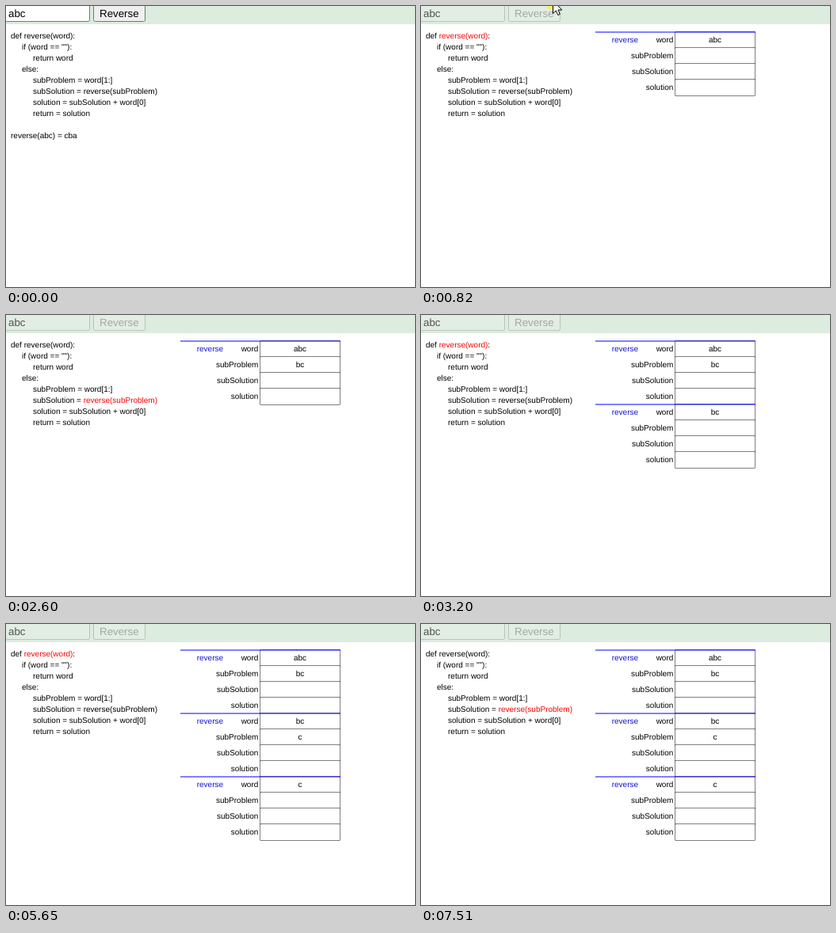
An HTML page with a canvas that plays this animation: 516x355 px, repeating every 8 s.

```html
<!DOCTYPE html>
<html lang="en">
<head>
<meta charset="utf-8">
<title>Recursive reverse</title>
<style>
  html, body { margin: 0; width: 100%; height: 100%; overflow: hidden; background: #fff; }
  canvas { display: block; }
</style>
</head>
<body>
<canvas id="stage" width="516" height="355"></canvas>
<script>
const ctx = document.getElementById('stage').getContext('2d');
const LOOP = 8000;
const CODE_FONT = '10px "Liberation Sans", Arial, sans-serif';
const FORM_FONT = '13.333px "Liberation Sans", Arial, sans-serif';
const WORD = 'abc';

// [indent, text]
const CODE = [
  [0, 'def reverse(word):'],
  [1, 'if (word == ""):'],
  [2, 'return word'],
  [1, 'else:'],
  [2, 'subProblem = word[1:]'],
  [2, 'subSolution = reverse(subProblem)'],
  [2, 'solution = subSolution + word[0]'],
  [2, 'return = solution'],
];
// Every call runs through these four steps: [line, highlighted part]
const PHASES = [
  [0, 'reverse(word)'],
  [1, '(word == "")'],
  [4, 'subProblem = word[1:]'],
  [5, 'reverse(subProblem)'],
];
const STEP_TIMES = [750, 1420, 2010, 2600, 3200, 3870, 4460, 5060, 5650, 6320, 6920, 7510];

function text(str, x, y, color = '#000', align = 'left') {
  ctx.fillStyle = color;
  ctx.textAlign = align;
  ctx.fillText(str, x, y);
}

function field(x, width, fill, border) {
  ctx.beginPath();
  ctx.roundRect(x + 0.5, -2.5, width - 1, 22, 2);
  ctx.fillStyle = fill;
  ctx.fill();
  ctx.strokeStyle = border;
  ctx.stroke();
}

function drawForm(disabled) {
  ctx.fillStyle = '#dcecde';
  ctx.fillRect(0, 0, 516, 23);
  ctx.font = FORM_FONT;
  const faded = 'rgba(239,239,239,.3)';
  const border = disabled ? 'rgba(118,118,118,.35)' : '#767676';
  field(-60, 166, disabled ? faded : '#fff', border);
  field(110, 66, disabled ? faded : '#efefef', border);
  text(WORD, 3, 14, disabled ? '#545454' : '#000');
  text('Reverse', 118, 14, disabled ? 'rgba(16,16,16,.3)' : '#000');
}

function drawCode(step) {
  const [activeLine, part] = step < 0 ? [-1, ''] : PHASES[step % 4];
  ctx.font = CODE_FONT;
  CODE.forEach(([indent, line], i) => {
    const x = 6 + 14 * indent, y = 41 + 14 * i;
    if (i !== activeLine) return text(line, x, y);
    const [before, after] = line.split(part);
    const partX = x + ctx.measureText(before).width;
    text(before, x, y);
    text(part, partX, y, '#f00');
    text(after, partX + ctx.measureText(part).width, y);
  });
  if (step < 0) text(`reverse(${WORD}) = ${[...WORD].reverse().join('')}`, 6, 167);
}

function drawCall(level, step) {
  const top = 33 + 80 * level;
  const word = WORD.slice(level);
  const rest = step >= 4 * level + 2 ? word.slice(1) : '';
  const rows = [['word', word], ['subProblem', rest], ['subSolution', ''], ['solution', '']];
  rows.forEach(([label, value], i) => {
    const y = top + 20 * i;
    ctx.strokeStyle = '#000';
    ctx.strokeRect(321, y, 100, 20);
    ctx.fillStyle = '#fff';
    ctx.fillRect(321, y, 100, 20);
    text(label, 318.3, y + 13, '#000', 'right');
    text(value, 371, y + 13, '#000', 'center');
  });
  text('reverse', 240.7, top + 13, '#1414d2');
  ctx.strokeStyle = '#00f';
  ctx.beginPath();
  ctx.moveTo(220, top);
  ctx.lineTo(422, top);
  ctx.stroke();
}

function drawPointer(t) {
  if (t < 200 || t >= 960) return;
  const tick = Math.floor((t - 200) / 69);
  const left = (1 - Math.min(tick / 6, 1)) ** 1.6;
  const x = 166 + 124 * left;
  const y = 5 + 253 * left - 12 * Math.max(0, tick - 8);
  ctx.save();
  ctx.translate(x, y);
  ctx.fillStyle = 'rgba(255,240,40,.62)';
  ctx.beginPath();
  ctx.arc(0, 0, 11.5, 0, 2 * Math.PI);
  ctx.fill();
  ctx.fillStyle = '#fff';
  ctx.strokeStyle = '#000';
  const arrow = new Path2D('M.5.5V16.5L4.3 13L6.8 18.5L9.3 17.4L7 12H11.8Z');
  ctx.fill(arrow);
  ctx.stroke(arrow);
  ctx.restore();
}

function draw(now) {
  const t = now % LOOP;
  const step = STEP_TIMES.filter(start => start <= t).length - 1;
  ctx.fillStyle = '#fff';
  ctx.fillRect(0, 0, 516, 355);
  drawForm(step >= 0);
  drawCode(step);
  for (let level = 0; step >= 4 * level; level++) drawCall(level, step);
  drawPointer(t);
}

ctx.textRendering = 'geometricPrecision';
const start = performance.now();
function frame() {
  draw(performance.now() - start);
  requestAnimationFrame(frame);
}
frame();
</script>
</body>
</html>
```
